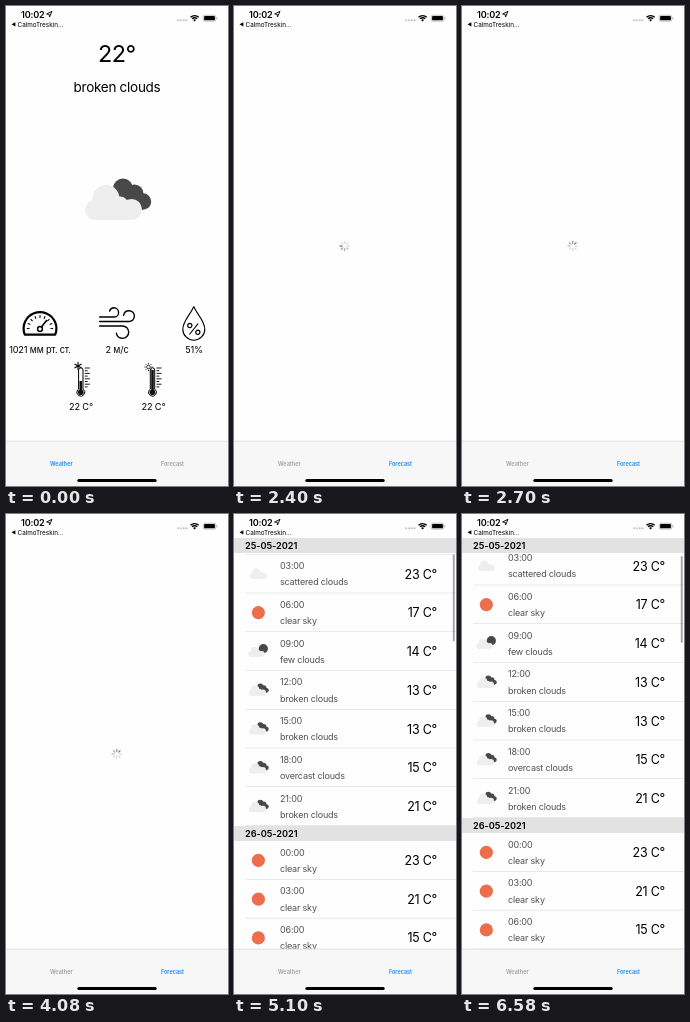
Write an HTML page with a canvas that moves like this. It is 222 px wide and 480 px high and loops after 7500 ms.

```html
<!DOCTYPE html>
<html lang="en">
<head>
<meta charset="utf-8">
<title>Weather</title>
<style>
html, body { margin: 0; width: 100%; height: 100%; overflow: hidden; background: #fefefe; }
canvas { display: block; width: 100vw; height: 100vh; }
</style>
</head>
<body>
<canvas id="stage"></canvas>
<script>
const W = 222, H = 480, LOOP = 7500;
const canvas = document.getElementById('stage');
const ctx = canvas.getContext('2d');
const BG = '#fefefe', BLUE = '#1e8bf0', GRAY = '#a2a2a2', DARK = '#484848', PALE = '#eeeeee', SUN = '#ec6e4c';

// Each beat holds until the next one starts.
const beats = [
  { at: 0, view: 'weather' },
  { at: 2400, view: 'loading', head: 6 },
  { at: 2500, view: 'loading', head: 7 },
  { at: 2700, view: 'loading', head: 9 },
  { at: 5000, view: 'forecast', scroll: 0, thumb: 38 },
  { at: 5100, view: 'forecast', scroll: 15.5, thumb: 40.5 },
  { at: 5200, view: 'forecast', scroll: 23.5, thumb: 42 }
];

function text(str, x, midY, size, { color = '#000', weight = 400, align = 'center', track = -0.02 } = {}) {
  ctx.font = `${weight} ${size}px Inter, Roboto, sans-serif`;
  ctx.letterSpacing = `${track * size}px`;
  ctx.textAlign = align;
  ctx.fillStyle = color;
  ctx.fillText(str, x, midY + size * 0.364);
}

function rect(x, y, w, h, color) {
  ctx.fillStyle = color;
  ctx.fillRect(x, y, w, h);
}

function pill(x, y, w, h, r, color) {
  ctx.beginPath();
  ctx.roundRect(x, y, w, h, r);
  ctx.fillStyle = color;
  ctx.fill();
}

function disc(x, y, r, color) {
  ctx.beginPath();
  ctx.arc(x, y, r, 0, Math.PI * 2);
  ctx.fillStyle = color;
  ctx.fill();
}

function ring(x, y, r, width) {
  ctx.beginPath();
  ctx.arc(x, y, r, 0, Math.PI * 2);
  ctx.lineWidth = width;
  ctx.stroke();
}

function line(x1, y1, x2, y2, width, color = '#000') {
  ctx.beginPath();
  ctx.moveTo(x1, y1);
  ctx.lineTo(x2, y2);
  ctx.lineWidth = width;
  ctx.strokeStyle = color;
  ctx.stroke();
}

function spokes(x, y, n, r1, r2, width, colorOf = () => '#000') {
  for (let i = 0; i < n; i++) {
    const a = i / n * Math.PI * 2 - Math.PI / 2, c = Math.cos(a), s = Math.sin(a);
    line(x + c * r1, y + s * r1, x + c * r2, y + s * r2, width, colorOf(i));
  }
}

function at(x, y, scale, draw) {
  ctx.save();
  ctx.translate(x, y);
  ctx.scale(scale, scale);
  draw();
  ctx.restore();
}

function paleCloud() {
  disc(-22, 9, 10, PALE);
  disc(-11, -2.5, 13.5, PALE);
  disc(3, 4, 8.5, PALE);
  disc(14.5, 8.5, 10.5, PALE);
  rect(-22, 4, 36.5, 15, PALE);
}

function darkCloud() {
  disc(6, -12.5, 10, DARK);
  disc(17.5, -7.5, 9, DARK);
  disc(26, 0.5, 8.2, DARK);
  rect(6, -6, 20, 14.7, DARK);
}

const icons = {
  clear() { disc(-0.5, 0, 22, SUN); },
  few() { disc(16, -9, 15.5, DARK); at(-3, 0, 0.95, paleCloud); },
  scattered() { at(3, -2, 1, paleCloud); },
  broken() { darkCloud(); paleCloud(); }
};

function gauge() {
  ctx.strokeStyle = '#000';
  ctx.lineWidth = 2.2;
  ctx.lineJoin = 'round';
  ctx.beginPath();
  ctx.arc(34, 322.5, 16.4, Math.PI * 0.88, Math.PI * 2.12);
  ctx.closePath();
  ctx.stroke();
  for (let i = 0; i <= 8; i++) {
    const a = Math.PI * (1 + i / 8), c = Math.cos(a), s = Math.sin(a);
    line(34 + c * 10.5, 322.5 + s * 10.5, 34 + c * 13.2, 322.5 + s * 13.2, 1.1);
  }
  line(35, 321.5, 41, 314, 1.6);
  ring(34, 323, 2.4, 1.5);
}

function wind() {
  const PI = Math.PI;
  ctx.strokeStyle = '#000';
  ctx.lineWidth = 1.4;
  ctx.lineCap = 'round';
  ctx.beginPath();
  ctx.moveTo(93.6, 311);
  ctx.lineTo(108, 311);
  ctx.arc(108, 306.4, 4.6, PI / 2, -PI * 0.9, true);
  ctx.moveTo(93.6, 315.5);
  ctx.lineTo(123, 315.5);
  ctx.arc(123, 310.1, 5.4, PI / 2, -PI * 0.95, true);
  ctx.moveTo(93.6, 320);
  ctx.lineTo(116.5, 320);
  ctx.arc(116.5, 326.2, 6.2, -PI / 2, PI * 0.95);
  ctx.stroke();
  ctx.lineCap = 'butt';
}

function drop() {
  ctx.strokeStyle = '#000';
  ctx.lineWidth = 1.1;
  ctx.beginPath();
  ctx.moveTo(0, -22.7);
  ctx.bezierCurveTo(-3, -15.2, -11, -8.2, -11, 0);
  ctx.arc(0, 0, 11, Math.PI, 0, true);
  ctx.bezierCurveTo(11, -8.2, 3, -15.2, 0, -22.7);
  ctx.stroke();
  ring(-4, -3.7, 2.1, 1.2);
  ring(4, 3.1, 2.1, 1.2);
  line(4.4, -5.7, -4.4, 5.3, 1.2);
}

function thermometer(x, level) {
  ctx.strokeStyle = '#000';
  ctx.lineWidth = 1;
  ctx.beginPath();
  ctx.moveTo(x - 2.2, 383);
  ctx.lineTo(x - 2.2, 364);
  ctx.arc(x, 364, 2.2, Math.PI, 0);
  ctx.lineTo(x + 2.2, 383);
  ctx.arc(x, 386.3, 3.9, -0.95, Math.PI + 0.95);
  ctx.stroke();
  disc(x, 386.3, 2.8, '#111');
  rect(x - 1.3, level, 2.6, 386 - level, '#111');
  for (let i = 0; i < 8; i++) line(x + 4, 362 + i * 2.7, x + (i % 2 ? 6.8 : 9), 362 + i * 2.7, 0.9);
}

function drawWeather() {
  text('22°', 110.8, 47, 23.4);
  text('broken clouds', 111, 80.7, 13.5);
  at(111, 195, 1, icons.broken);
  gauge();
  wind();
  at(187.8, 323.2, 1, drop);
  text('1021 мм рт. ст.', 34, 343.2, 9.2);
  text('2 м/с', 111, 343.2, 9.2);
  text('51%', 188, 343.2, 9.2);
  thermometer(74.8, 375);
  spokes(72, 360, 6, 0, 4, 1.1);
  thermometer(146.5, 364);
  disc(142.5, 361, 2.4, BG);
  ctx.strokeStyle = '#000';
  ring(142.5, 361, 1.8, 0.8);
  spokes(142.5, 361, 8, 2.8, 4.1, 0.8);
  text('22 C°', 75, 401, 9.2);
  text('22 C°', 147.5, 401, 9.2);
}

function drawLoading({ head }) {
  ctx.lineCap = 'round';
  spokes(110.7, 240, 8, 2.6, 4.7, 1.3, i => {
    const age = (head - i + 16) % 8;
    return `rgba(60,60,67,${Math.max(0.18, 0.62 - age * 0.11)})`;
  });
  ctx.lineCap = 'butt';
}

const ROW = 38.75, HEAD = 15, TOP = 24;
const days = [
  { date: '25-05-2021', y: 2.3, rows: [
    ['broken clouds', 24], ['scattered clouds', 23], ['clear sky', 17], ['few clouds', 14],
    ['broken clouds', 13], ['broken clouds', 13], ['overcast clouds', 15], ['broken clouds', 21]] },
  { date: '26-05-2021', y: 327.5, rows: [['clear sky', 23], ['clear sky', 21], ['clear sky', 15]] }
];

function drawRow(y, hour, sky, temp) {
  const kind = sky.split(' ')[0];
  const color = '#505050';
  at(24.5, y + 19.4, 0.3, icons[kind === 'overcast' ? 'broken' : kind]);
  text(`${String(hour).padStart(2, '0')}:00`, 46, y + 11.4, 9, { color, align: 'left' });
  text(sky, 46, y + 27.5, 9, { color, align: 'left' });
  text(`${temp} C°`, 203, y + 19.4, 12.5, { align: 'right' });
  rect(11, y + ROW - 0.6, W - 11, 0.6, '#dcdcdc');
}

function drawHeader(y, date) {
  rect(0, y, W, HEAD, '#e2e2e2');
  text(date, 11, y + HEAD / 2, 9.2, { weight: 600, align: 'left', track: -0.005 });
}

function drawForecast({ scroll, thumb }) {
  for (const day of days) {
    const y = day.y - scroll;
    day.rows.forEach(([sky, temp], i) => drawRow(y + HEAD + i * ROW, i * 3, sky, temp));
    drawHeader(Math.max(TOP, y), day.date);
  }
  rect(0, 0, W, TOP, BG);
  pill(218.8, thumb, 1.9, 87, 0.95, 'rgba(0,0,0,.36)');
}

function drawStatus() {
  text('10:02', 15, 8.3, 9.1, { weight: 600, align: 'left' });
  ctx.strokeStyle = '#000';
  ctx.lineWidth = 0.9;
  ctx.lineJoin = 'round';
  ctx.beginPath();
  ctx.moveTo(46, 5.3);
  ctx.lineTo(40.6, 8);
  ctx.lineTo(43.2, 8.3);
  ctx.lineTo(43.5, 11);
  ctx.closePath();
  ctx.stroke();

  ctx.fillStyle = '#000';
  ctx.beginPath();
  ctx.moveTo(5.5, 18.3);
  ctx.lineTo(9.4, 16.2);
  ctx.lineTo(9.4, 20.4);
  ctx.fill();
  text('CalmoTreskin...', 11.5, 18.4, 6.35, { align: 'left', track: 0 });

  for (let i = 0; i < 4; i++) disc(172.2 + i * 2.8, 14.2, 0.95, '#bbb');

  // Wi-Fi fan
  const fan = [-Math.PI * 0.75, -Math.PI * 0.25];
  ctx.strokeStyle = ctx.fillStyle = '#000';
  ctx.lineWidth = 1.35;
  for (const r of [3.6, 5.8]) {
    ctx.beginPath();
    ctx.arc(188.6, 15.4, r, ...fan);
    ctx.stroke();
  }
  ctx.beginPath();
  ctx.moveTo(188.6, 15.4);
  ctx.arc(188.6, 15.4, 2.1, ...fan);
  ctx.fill();

  // Battery
  ctx.beginPath();
  ctx.roundRect(197.2, 9.2, 12.6, 6, 1.7);
  ctx.lineWidth = 0.6;
  ctx.strokeStyle = '#999';
  ctx.stroke();
  pill(198.1, 10.1, 10.8, 4.2, 0.9, '#000');
  pill(210.5, 11.2, 0.8, 2.1, 0.4, '#999');
}

function drawTabs(first) {
  rect(0, 434.8, W, H - 434.8, '#f7f7f7');
  rect(0, 434.8, W, 0.6, '#cfcfcf');
  const tab = (label, x, active) =>
    text(label, x, 457.8, 5.5, { weight: 600, track: 0, color: active ? BLUE : GRAY });
  tab('Weather', 55.3, first);
  tab('Forecast', 166.5, !first);
  pill(71.3, 473, 79.4, 3, 1.5, '#000');
}

const views = { weather: drawWeather, loading: drawLoading, forecast: drawForecast };

function fit() {
  const dpr = window.devicePixelRatio || 1;
  const w = Math.round(innerWidth * dpr), h = Math.round(innerHeight * dpr);
  if (canvas.width !== w || canvas.height !== h) {
    canvas.width = w;
    canvas.height = h;
  }
  ctx.setTransform(w / W, 0, 0, h / H, 0, 0);
}

const start = performance.now();

function frame() {
  const t = (performance.now() - start) % LOOP;
  const beat = beats.filter(b => b.at <= t).pop();
  fit();
  rect(0, 0, W, H, BG);
  views[beat.view](beat);
  drawStatus();
  drawTabs(beat.view === 'weather');
  requestAnimationFrame(frame);
}
frame();
</script>
</body>
</html>
```
